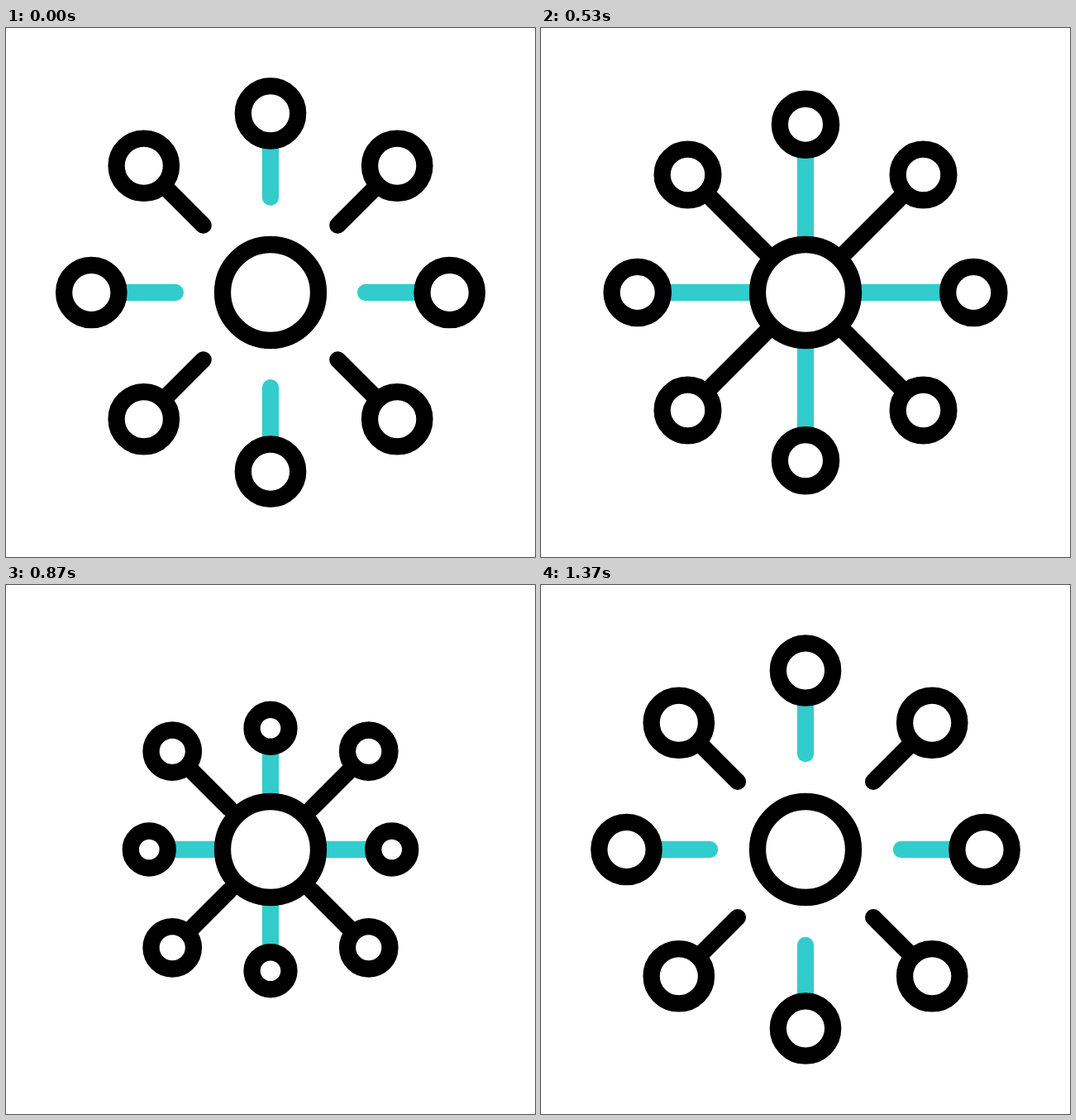
These frames come from a looping animation (640x640 px, 1670 ms). An HTML page with a canvas:

```html
<!DOCTYPE html>
<html lang="en">
<head>
<meta charset="utf-8">
<style>
  html, body { margin: 0; height: 100%; overflow: hidden; background: #fff; }
  canvas { display: block; }
</style>
</head>
<body>
<canvas id="stage" width="640" height="640"></canvas>
<script>
const ctx = document.getElementById('stage').getContext('2d');
const LOOP = 1670, FRAME = 100 / 3;
const REACH = 216.7;     // hub centre to node centre at rest
const GAP_END = 116.1;   // inner end of a spoke at rest

// Key times are in frames; "shrink" is the scale lost, "grow" the spoke's extension.
const START = -1, JOINED = 12.4;
const straight = { color: '#33cccc', turn: 0, low: 24, end: 41.5, shrink: 0.375, grow: 58.5 };
const diagonal = { color: '#000', turn: Math.PI / 4, low: 22.4, end: 36.9, shrink: 0.33, grow: 67.3 };

const progress = (f, a, b) => Math.min(1, Math.max(0, (f - a) / (b - a)));
const smooth = x => x * x * (3 - 2 * x);

// cubic-bezier(1/3, 0, 5/6, 5/6): slow start, brisk finish
function easeIn(x) {
  let t = x;
  for (let i = 0; i < 16; i++) t = x - 0.5 * t * t * (1 - t);
  return t * t * (2.5 - 1.5 * t);
}

function ring(x, y, r) {
  ctx.beginPath();
  ctx.arc(x, y, r, 0, 2 * Math.PI);
  ctx.fill();
  ctx.stroke();
}

function drawArms(arms, f) {
  const back = easeIn(1 - progress(f, arms.low, arms.end));
  const squeeze = f < arms.low ? easeIn(progress(f, JOINED, arms.low)) : back;
  const extend = f < arms.low ? smooth(progress(f, START, JOINED)) : back;
  const scale = 1 - arms.shrink * squeeze;
  const inner = GAP_END - arms.grow * extend;
  for (let i = 0; i < 4; i++) {
    ctx.save();
    ctx.rotate(arms.turn + i * Math.PI / 2);
    ctx.strokeStyle = arms.color;
    ctx.beginPath();
    ctx.moveTo(inner, 0);
    ctx.lineTo(REACH * scale, 0);
    ctx.stroke();
    ctx.strokeStyle = '#000';
    ring(REACH * scale, 0, 33.2 * scale);
    ctx.restore();
  }
}

function draw(now) {
  const f = Math.floor((now % LOOP + 4) / FRAME);
  ctx.setTransform(1, 0, 0, 1, 0, 0);
  ctx.fillStyle = '#fff';
  ctx.fillRect(0, 0, 640, 640);
  ctx.translate(320, 320);
  ctx.lineWidth = 20.3;
  ctx.lineCap = 'round';
  drawArms(straight, f % 50);
  drawArms(diagonal, f % 50);
  ctx.strokeStyle = '#000';
  ring(0, 0, 58);
}

let begin;
function tick(now) {
  begin ??= now;
  draw(now - begin);
  requestAnimationFrame(tick);
}
draw(0);
requestAnimationFrame(tick);
</script>
</body>
</html>
```
